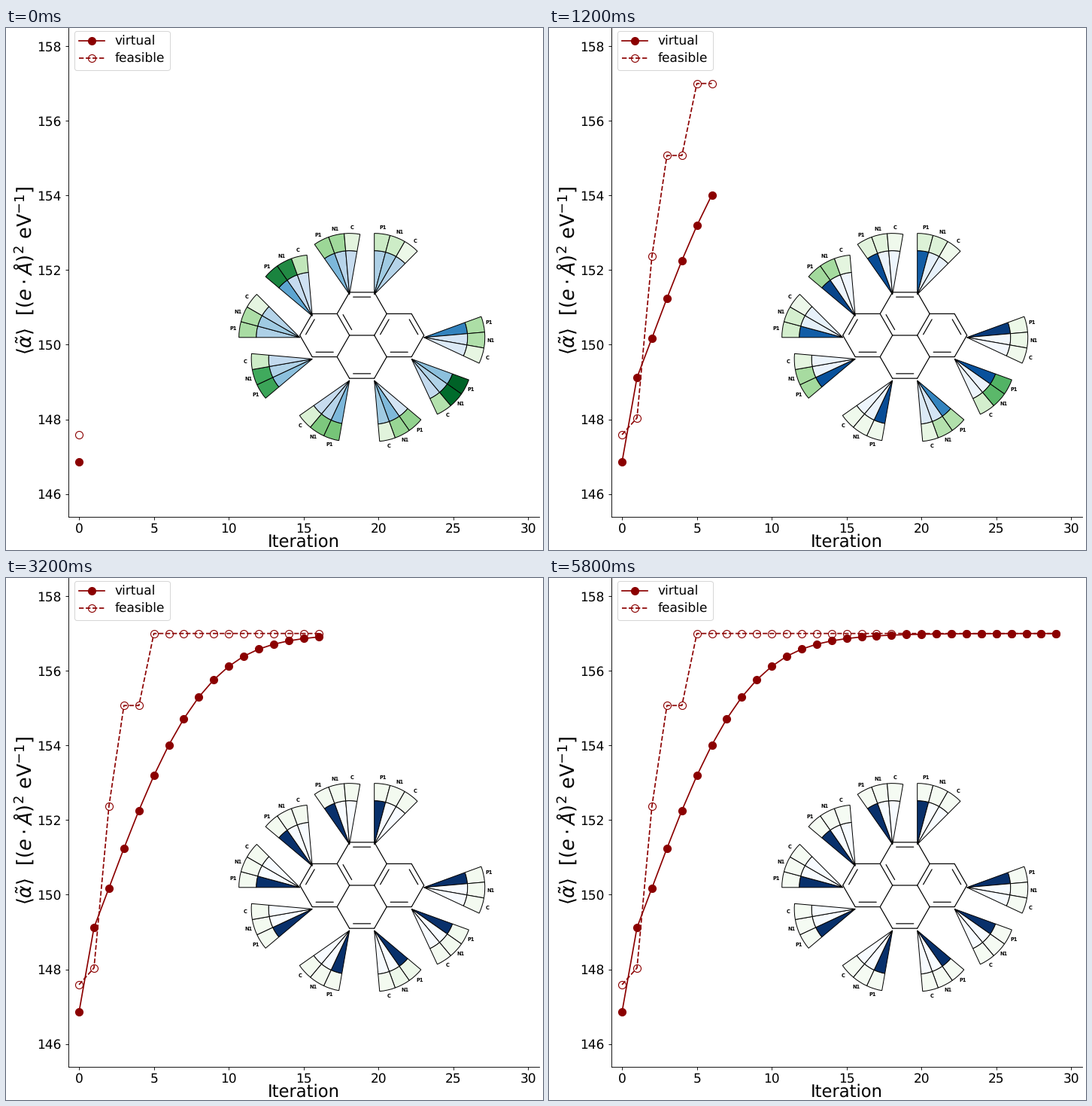
These frames come from a looping animation (714 by 693 pixels, 6 s). A matplotlib script:

```python
import numpy as np
import matplotlib.pyplot as plt
from matplotlib.animation import FuncAnimation
from matplotlib.patches import Wedge

W, H, DPI = 714, 693, 72          # at 72 dpi one point is one pixel
STEPS, INTERVAL = 30, 200
RED = "darkred"
plt.rcParams.update({"font.family": "DejaVu Sans", "text.hinting": "none"})

# The gap to the optimum closes ever faster until its rate levels off
OPTIMUM = 157.0
rate = np.minimum(.12 + .0247 * np.arange(1, STEPS - 1), .375)
gap = np.r_[10.14, 7.88 * np.exp(-np.r_[0, np.cumsum(rate)])]
virtual = OPTIMUM - gap
feasible = np.repeat([147.59, 148.04, 152.38, 155.07, OPTIMUM], [1, 1, 1, 2, STEPS - 5])

# Molecule sites: ring, corner, first angle of the fan
SITES = [("right", 0, -25), ("top", 1, 45), ("top", 2, 80), ("left", 2, 95),
         ("left", 3, 135), ("left", 4, 175), ("bottom", 4, 215),
         ("bottom", 5, 275), ("right", 5, 295)]
SHARE = np.array([.68, .33, .46, .54, .33, .42, .46, .18, .42])    # first weight of P1
LEVEL = np.array([.26, .18, .30, .60, .27, .50, .38, .32, .70])    # first mean gradient
HOLD = np.array([5, 10, 6, 7, 8, 8, 3, 12, 9])                     # steps until it fades


def weights(n):
    """P1 wins along a logistic curve; N1 and C split the rest."""
    logit = np.log(SHARE / (1 - SHARE)) + .3 * n + .013 * n ** 2
    p = 1 / (1 + np.exp(-logit))
    return np.column_stack([p, .55 * (1 - p), .45 * (1 - p)])


def gradients(n):
    fade = LEVEL * np.exp(-(n / HOLD) ** 2)
    return np.maximum(np.outer(fade, [1.3, 1.25, .45]), max(.015, .07 - .0025 * n))


fig = plt.figure(figsize=(W / DPI, H / DPI), dpi=DPI, facecolor="white")

# Chart; its top edge lies just above the stage
LEFT, RIGHT, TOP, BOTTOM = 82.5, 709, -5, 649
ax = fig.add_axes([LEFT / W, 1 - BOTTOM / H, (RIGHT - LEFT) / W, (BOTTOM - TOP) / H])
x0, dx, y0, dy = 97.1, 19.905, 618.7, 49.55
ax.set_xlim((LEFT - x0) / dx, (RIGHT - x0) / dx)
ax.set_ylim(146 + (y0 - BOTTOM) / dy, 146 + (y0 - TOP) / dy)
ax.set_xticks(range(0, 31, 5))
ax.set_yticks(range(146, 159, 2))
ax.tick_params(labelsize=17, length=4, width=.9)
ax.tick_params(axis="x", pad=3.4)
ax.tick_params(axis="y", pad=4.5)
ax.spines[["top", "right"]].set_visible(False)
ax.spines[["left", "bottom"]].set_linewidth(.9)
style = dict(color=RED, marker="o", ms=10, mew=1.13, lw=1.7)
solid, = ax.plot([], [], "-", label="virtual", **style)
dashed, = ax.plot([], [], "--", mfc="none", label="feasible", **style)
ax.legend(loc="upper left", fontsize=17, labelspacing=.41, borderpad=.37)
fig.text(395.75 / W, 4 / H, "Iteration", size=22.67, ha="center", va="baseline")
fig.text(34.8 / W, 371.3 / H,
         r"$\langle\tilde{\alpha}\rangle$  [$(e\cdot Å)^2$ eV$^{-1}$]", size=25.5,
         rotation=90, rotation_mode="anchor", ha="center", va="baseline")

# Molecule, in pixel coordinates
mol = fig.add_axes([0, 0, 1, 1], xlim=(0, W), ylim=(0, H))
mol.axis("off")
SIDE = 33
APO = SIDE * np.sqrt(3) / 2
MID = np.array([473.2, 285])
CENTERS = dict(top=MID + [0, APO], bottom=MID - [0, APO],
               left=MID - [1.5 * SIDE, 0], right=MID + [1.5 * SIDE, 0])


def polar(r, deg):
    return r * np.array([np.cos(np.radians(deg)), np.sin(np.radians(deg))])


def corner(ring, k):
    return CENTERS[ring] + polar(SIDE, 60 * k)


def bond(a, b):
    mol.plot(*zip(a, b), color="black", lw=1.2, solid_capstyle="round", snap=False)


edges = {}
for ring in CENTERS:
    for k in range(6):
        a, b = corner(ring, k), corner(ring, k + 1)
        edges[tuple(np.round((a + b) / 2, 1))] = (a, b)
for a, b in edges.values():
    bond(a, b)
for ring, sides in dict(top=(1, 3), bottom=(4,), left=(2, 4), right=(0, 2, 4)).items():
    for k in sides:
        a, b = corner(ring, k), corner(ring, k + 1)
        mid = CENTERS[ring] + .78 * ((a + b) / 2 - CENTERS[ring])
        bond(mid - .35 * (b - a), mid + .35 * (b - a))

R_IN, R_OUT, R_TEXT, STEP = 58, 81, 89, 15
inner, outer = [], []
for ring, k, start in SITES:
    tip = corner(ring, k) - [0, 2.8]
    for i, name in enumerate(("P1", "N1", "C")):
        lo = start + STEP * (2 - i)
        for group, r, width in ((inner, R_IN, None), (outer, R_OUT, R_OUT - R_IN)):
            wedge = Wedge(tip, r, lo, lo + STEP, width=width, ec="black", lw=1, zorder=3)
            group.append(mol.add_patch(wedge))
        mol.text(*(tip + polar(R_TEXT, lo + STEP / 2)), name, size=6.6, weight="bold",
                 ha="center", va="center")


def paint(group, values, cmap):
    for wedge, v in zip(group, values.flat):
        wedge.set_facecolor(cmap(float(v)))


def draw(n):
    t = np.arange(n + 1)
    solid.set_data(t, virtual[:n + 1])
    dashed.set_data(t, feasible[:n + 1])
    paint(inner, weights(n), plt.cm.Blues)
    paint(outer, gradients(n), plt.cm.Greens)
    return [solid, dashed, *inner, *outer]


anim = FuncAnimation(fig, draw, frames=STEPS, interval=INTERVAL, repeat=True)
plt.show()
```
